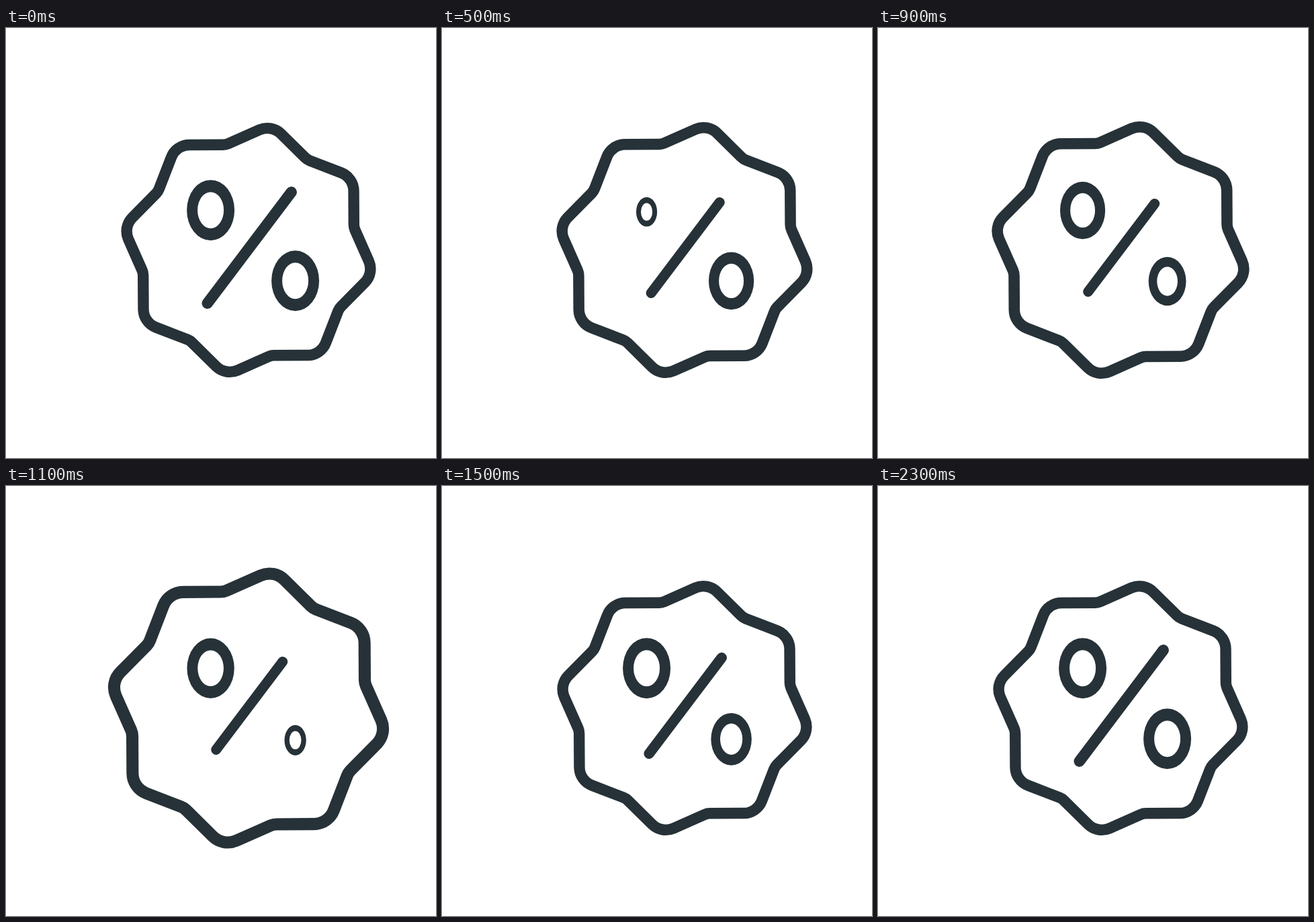
An HTML page for the animation above (10000 ms loop, 640 by 640 pixels).

```html
<!DOCTYPE html>
<html lang="en">
<head>
<meta charset="utf-8">
<title>Discount badge</title>
<style>
  html, body { margin: 0; width: 100%; height: 100%; overflow: hidden; background: #fff; }
  svg { display: block; width: 100vw; height: 100vh; }
  .line { fill: none; stroke: #263238; stroke-width: 16.4; stroke-linecap: round; stroke-linejoin: round; }
  .ring { fill: #263238; fill-rule: evenodd; }
</style>
</head>
<body>
<svg viewBox="0 0 640 640">
  <path id="badge" class="line"/>
  <path id="ringA" class="ring"/>
  <path id="ringB" class="ring"/>
  <path id="slash" class="line"/>
</svg>
<script>
const LOOP = 10000, STEP = 100, END = 2300;
const el = id => document.getElementById(id);
const badge = el('badge'), slash = el('slash'), ringA = el('ringA'), ringB = el('ringB');
const clamp = x => Math.min(1, Math.max(0, x));
const sine = x => (1 - Math.cos(Math.PI * clamp(x))) / 2;

// Eight-pointed outline with wide arcs at the tips and small ones between
function badgePath(cx, cy) {
  const pts = [];
  for (let i = 0; i < 16; i++) {
    const tip = i % 2, a = (-12.1 + i * 22.5) * Math.PI / 180;
    const r = tip ? 190 : 160.4;
    pts.push({ x: cx + r * Math.sin(a), y: cy - r * Math.cos(a), tip });
  }
  const toward = (p, q, d) => {
    const k = d / Math.hypot(q.x - p.x, q.y - p.y);
    return (p.x + (q.x - p.x) * k).toFixed(2) + ' ' + (p.y + (q.y - p.y) * k).toFixed(2);
  };
  return pts.map((p, i) => {
    const r = p.tip ? 29 : 20, cut = p.tip ? 19.7 : 4.1;
    const from = toward(p, pts[(i + 15) % 16], cut);
    const to = toward(p, pts[(i + 1) % 16], cut);
    return `${i ? 'L' : 'M'}${from}A${r} ${r} 0 0 ${p.tip} ${to}`;
  }).join('') + 'Z';
}

function oval(cx, cy, rx, ry) {
  return `M${cx - rx} ${cy}a${rx} ${ry} 0 1 1 ${2 * rx} 0a${rx} ${ry} 0 1 1 ${-2 * rx} 0Z`;
}
const ring = (cx, cy) => oval(cx, cy, 35.5, 45) + oval(cx, cy, 19.5, 27);

function zoom(node, sx, sy, cx, cy) {
  node.setAttribute('transform', `translate(${cx} ${cy}) scale(${sx} ${sy}) translate(${-cx} ${-cy})`);
}

// Slow start, sharp dip at the turning point, slow settle
function dip(t, turn, end) {
  const x = clamp(t < turn ? t / turn : (end - t) / (end - turn));
  return 0.26 * x * x + 0.42 * Math.pow(x, 9.4);
}

function shrink(node, d, cx, cy) {
  zoom(node, 1 - 1.06 * d, 1 - 0.97 * d, cx, cy);
}

function swell(t) {
  if (t > 1100) return 0.103 * Math.pow(clamp((1500 - t) / 400), 3);
  const x = t / 1100;
  return 0.011 * x + 0.092 * Math.pow(x, 20);
}

function drawSlash(k) {
  const dx = 62.5 * (1 - 0.208 * k), dy = 82.7 * (1 - 0.208 * k);
  slash.setAttribute('d', `M${362.2 - dx} ${327 + dy}L${362.2 + dx} ${327 - dy}`);
  slash.style.strokeWidth = 16.4 - 1.4 * k;
}

function draw(ms) {
  const t = Math.min(END, Math.floor(ms % LOOP / STEP) * STEP);
  const s = 1 + swell(t);
  zoom(badge, s, s, 361, 330.5);
  shrink(ringA, dip(t, 470, 1240), 304.6, 276);
  shrink(ringB, dip(t, 1150, END), 430.6, 380.5);
  drawSlash(sine(t / 640) - sine((t - 1100) / 1000));
}

badge.setAttribute('d', badgePath(361, 330.5));
ringA.setAttribute('d', ring(304.6, 271.2));
ringB.setAttribute('d', ring(430.6, 376.2));

const start = performance.now();
function tick() {
  draw(performance.now() - start);
  requestAnimationFrame(tick);
}
tick();
</script>
</body>
</html>
```
